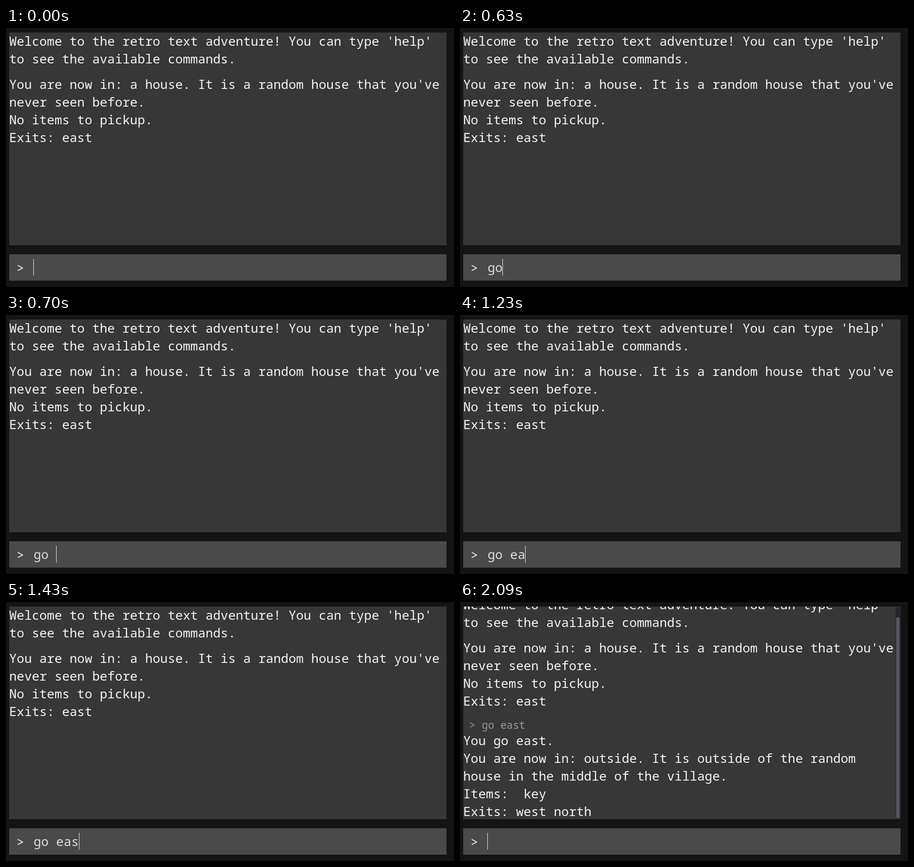
Animation, 983 px wide and 570 px high, one loop 8000 ms. Source, as an HTML page:

```html
<!DOCTYPE html>
<html lang="en">
<head>
<meta charset="utf-8">
<title>Text adventure</title>
<style>
  html, body { margin: 0; width: 100%; height: 100%; overflow: hidden; background: #141414; }
  svg { display: block; width: 983px; height: 570px; }
  text { font: 27.62px "IBM Plex Mono", "Noto Sans Mono", "Liberation Mono", monospace; fill: #f4f4f4; white-space: pre; }
  text.echo { font-size: 22.7px; fill: #999; }
  #typed { fill: #ddd; }
</style>
</head>
<body>
<svg viewBox="0 0 983 570">
  <defs><clipPath id="view"><rect x="7" y="10" width="959.5" height="468"/></clipPath></defs>
  <rect width="983" height="570" fill="#141414"/>
  <rect x="7" y="10" width="959.5" height="468" fill="#373737"/>
  <g clip-path="url(#view)">
    <g id="log"></g>
    <g id="bar">
      <rect x="956" y="10.5" width="9.5" height="467" rx="4.5" fill="#242428" stroke="#303036"/>
      <rect x="957" y="33" width="7.5" height="443" rx="3.7" fill="#55555f"/>
    </g>
  </g>
  <rect x="7" y="498" width="959.5" height="58" fill="#4a4a4a"/>
  <text x="23.3" y="538">&gt;</text>
  <text id="typed" x="60.4" y="537"></text>
  <rect id="caret" y="508" width="1" height="37" fill="#f4f4f4"/>
</svg>
<script>
const LOOP = 8000, SUBMIT = 2090, ADVANCE = 16.56, LINE = 39, SCROLL = 22.6;
const COMMAND = "go east";
const KEY_TIMES = [500, 630, 700, 1030, 1230, 1430, 1630];
const $ = id => document.getElementById(id);
const log = $("log"), bar = $("bar"), typed = $("typed"), caret = $("caret");

function addLine(parent, text, y, className = "") {
  const el = document.createElementNS("http://www.w3.org/2000/svg", "text");
  el.setAttribute("x", 7);
  el.setAttribute("y", y);
  el.setAttribute("class", className);
  el.textContent = text;
  parent.append(el);
}

function addBlock(parent, y, lines) {
  lines.forEach((text, i) => addLine(parent, text, y + i * LINE));
}

addBlock(log, 38.7, [
  "Welcome to the retro text adventure! You can type 'help'",
  "to see the available commands."
]);
addBlock(log, 133.5, [
  "You are now in: a house. It is a random house that you've",
  "never seen before.",
  "No items to pickup.",
  "Exits: east"
]);

const reply = document.createElementNS("http://www.w3.org/2000/svg", "g");
log.append(reply);
addLine(reply, " > " + COMMAND, 279 + SCROLL, "echo");
addBlock(reply, 315 + SCROLL, [
  "You go east.",
  "You are now in: outside. It is outside of the random",
  "house in the middle of the village.",
  "Items:  key",
  "Exits: west north"
]);

function render(t) {
  const sent = t >= SUBMIT;
  const count = sent ? 0 : KEY_TIMES.filter(k => t >= k).length;
  typed.textContent = COMMAND.slice(0, count);
  // The caret sits on whole pixels.
  caret.setAttribute("x", Math.round(60.3 + count * ADVANCE));
  log.setAttribute("transform", `translate(0 ${sent ? -SCROLL : 0})`);
  for (const el of [reply, bar]) el.setAttribute("visibility", sent ? "visible" : "hidden");
}

const start = performance.now();
function tick() {
  render((performance.now() - start) % LOOP);
  requestAnimationFrame(tick);
}
tick();
</script>
</body>
</html>
```
